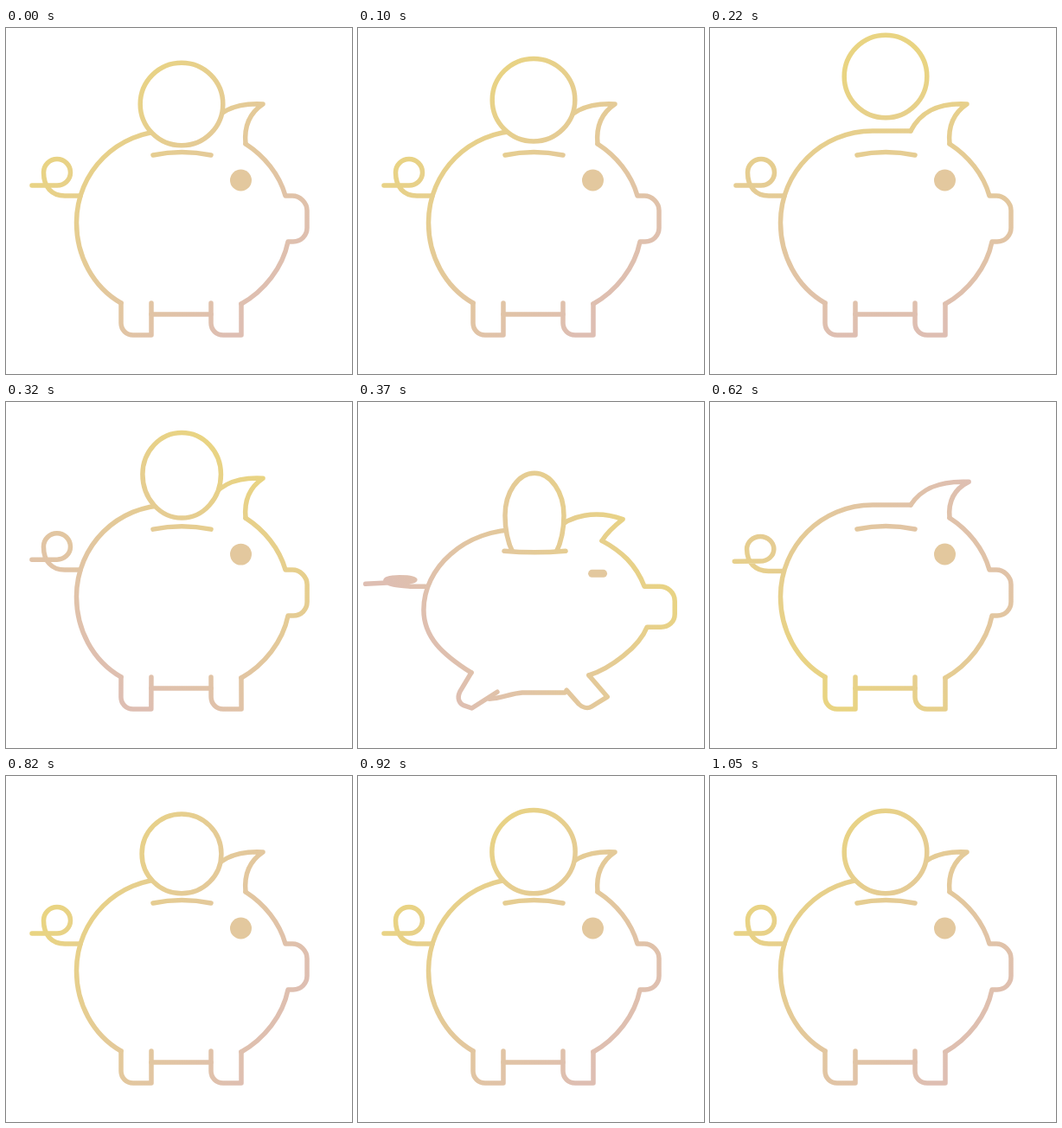
Animation of 400 by 400 pixels, one loop 1070 ms. Source, as an HTML page with a canvas:

```html
<!DOCTYPE html>
<html lang="en">
<head>
<meta charset="utf-8">
<title>Piggy bank</title>
<style>
  html, body { margin: 0; height: 100%; overflow: hidden; background: #fff; }
  canvas { display: block; }
</style>
</head>
<body>
<canvas id="stage" width="400" height="400"></canvas>
<script>
const ctx = document.getElementById('stage').getContext('2d');
const LOOP = 1070;
const YELLOW = '#e9d482', PINK = '#debeb2', TAN = '#e3c89e';

// Each part: [resting outline, squashed outline], same commands in both.
const back = [
  'M133 318 C100 299 81.5 263 81.5 225 C81.5 166 129 119 188 119 L232 119',
  'M131 313 C98 292 76 272 76 240 C76 192 122 147 188 147 L230 147'];
const ear = [
  'M232 119 C243 98 262 86 297 88 C282 98 275 114 277 134',
  'M230 147 C244 131 275 124 306 135 C297 142 288 150 282 160'];
const face = [
  'M277 134 C298.6 148 316 169 323 194 L331 194 C340 194 348 202 348 211 L348 231 C348 240 341 247 332 247 L326 247 C320 277 298.5 304 272 319',
  'M282 160 C304 172 321 187 331 213 L348 213 C358 213 366 220 366 230 L366 245 C366 254 359 260 350 260 L334 260 C325 283 292 308 267 316'];
const frontLeg = [
  'M272 319 L272 355 L251 355 C243 355 237 349 237 341 L237 318',
  'M267 316 L288 341 L270 352 C265 355 259 353 255 349 L241 333'];
const backLeg = [
  'M133 318 L133 341 C133 349 139 355 147 355 L168 355 L168 318',
  'M131 313 L118 335 C114 343 118 349 123 351 L132 354 L161 335'];
const belly = [
  'M168 331 C180 331 190 331 203 331 L237 331',
  'M152 343 C165 343 176 337 190 336 L239 336'];
const slot = ['M170 147 Q203 140 237 147', 'M169 172 Q204 175 240 172'];
const tail = [
  'M30 182 L59 182 C67.5 182 74.5 175.5 74.5 167 C74.5 158.5 67.5 151.5 59 151.5 C50.5 151.5 43.5 158.5 43.5 167 C43.5 184 53 194 68 194 L86 194',
  'M9 210 L48 208 C58 208 66 207 66 205 C66 203 57 202 48 202 C39 202 32 203 32 206 C33 211 50 212 62 213 L78 213'];

const lerp = (a, b, k) => a + (b - a) * k;
const progress = (t, from, to) => Math.min(1, Math.max(0, (t - from) / (to - from)));
const ease = (t, from, to) => (1 - Math.cos(Math.PI * progress(t, from, to))) / 2;
const bump = (t, from, to) => Math.sin(Math.PI * progress(t, from, to));

// Blends both outlines; narrow pulls the upper body in, flop lowers the ear tip.
function outline([rest, squashed], k, narrow, flop) {
  const ends = squashed.match(/[\d.]+/g);
  let i = 0;
  const d = rest.replace(/([\d.]+) ([\d.]+)/g, (_, x, y) => {
    let px = lerp(+x, +ends[i++], k), py = lerp(+y, +ends[i++], k);
    px += narrow * (203 - px) * Math.max(0, (320 - py) / 110);
    const drop = flop * Math.max(0, 110 - py);
    return `${px + drop / 2} ${py + drop}`;
  });
  return new Path2D(d);
}

function coinShape(t) {
  const shape = { x: 203, y: 88, rx: 47.8, up: 47.8, down: 47.8 };
  if (t > 630) {
    // Springs out of the slot, resting on its lower edge.
    const age = t - 630;
    const size = 1 - Math.exp(-0.01694 * age) * Math.cos(2 * Math.PI * age / 190);
    shape.rx = shape.up = shape.down = 47.8 * size;
    shape.y = 135.8 - shape.up;
  } else {
    const squeeze = progress(t, 310, 370);
    shape.rx = lerp(47.8, 34, squeeze);
    shape.up = lerp(47.8, 49, squeeze);
    shape.down = lerp(47.8, 63, squeeze);
    shape.x += squeeze;
    shape.y -= 32 * ease(t, 60, 222);
    if (t > 225) shape.y += 74 * ((t - 225) / 145) ** 2.4;
  }
  return shape;
}

function drawCoin(t, floor) {
  const { x, y, rx, up, down } = coinShape(t);
  ctx.save();
  if (t < 630) {
    ctx.beginPath();
    ctx.rect(0, 0, 400, floor);
    ctx.clip();
  }
  ctx.beginPath();
  ctx.ellipse(x, y, rx, up, 0, Math.PI, 2 * Math.PI);
  ctx.ellipse(x, y, rx, down, 0, 0, Math.PI);
  ctx.closePath();
  ctx.fillStyle = '#fff';
  ctx.fill();
  ctx.stroke();
  ctx.restore();
}

function drawEye(k, narrow) {
  const rx = lerp(12.5, 11, k), ry = lerp(12.5, 4.5, k);
  const x = lerp(271.5, 277, k) - narrow * 70, y = lerp(176, 198, k);
  ctx.beginPath();
  ctx.roundRect(x - rx, y - ry, 2 * rx, 2 * ry, Math.min(rx, ry));
  ctx.fillStyle = TAN;
  ctx.fill();
}

function turningGradient(t) {
  const angle = Math.PI * (1.25 + 2 * ease(t, 40, 935));
  const dx = 150 * Math.cos(angle), dy = 150 * Math.sin(angle);
  const gradient = ctx.createLinearGradient(200 + dx, 200 + dy, 200 - dx, 200 - dy);
  gradient.addColorStop(0, YELLOW);
  gradient.addColorStop(1, PINK);
  return gradient;
}

function draw(t) {
  const k = 1.3 * (ease(t, 318, 395) - ease(t, 395, 508));
  const narrow = 0.035 * bump(t, 410, 550);
  const sway = bump(t, 520, 700);
  const stroke = (part, amount = k) => ctx.stroke(outline(part, amount, narrow, 0.2 * sway));

  ctx.fillStyle = '#fff';
  ctx.fillRect(0, 0, 400, 400);
  ctx.strokeStyle = turningGradient(t);
  ctx.lineWidth = 5.5;
  ctx.lineCap = ctx.lineJoin = 'round';

  [back, ear, face, frontLeg, backLeg, belly].forEach(part => stroke(part));
  stroke(tail, k + 0.08 * sway);
  drawEye(k, narrow);
  drawCoin(t, lerp(145, 173, k));
  stroke(slot);
}

const start = performance.now();
function frame() {
  const t = (performance.now() - start) % LOOP;
  draw(t < 70 ? 0 : t);
  requestAnimationFrame(frame);
}
frame();
</script>
</body>
</html>
```
